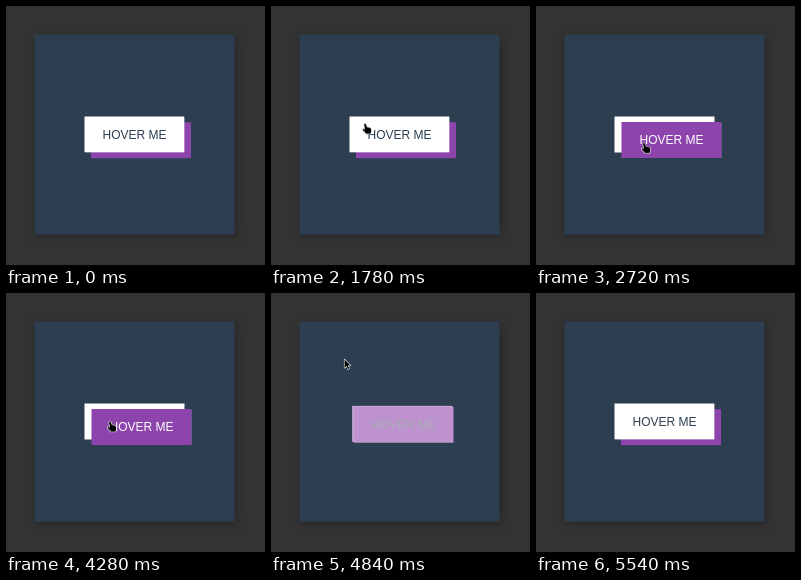
Animation of 259 by 259 pixels, one loop 8000 ms. Source, as an HTML page:

```html
<!DOCTYPE html>
<html lang="en">
<head>
<meta charset="utf-8">
<title>Hover button</title>
<style>
  html, body { margin: 0; width: 100%; height: 100%; overflow: hidden; background: #333; }
  svg { display: block; width: 100vw; height: 100vh; }
  .panel { fill: #2c3e50; filter: drop-shadow(2px 2px 4px rgba(0, 0, 0, .24)); }
  text { font: 12px "Liberation Sans", Arial, sans-serif; text-anchor: middle; }
  #pointer path { stroke: #fff; stroke-width: 1.1; stroke-linejoin: round; paint-order: stroke; }
</style>
</head>
<body>
<svg viewBox="0 0 259 259">
  <rect class="panel" x="28.5" y="28.5" width="200" height="200"/>
  <rect id="shade" width="100" height="36"/>
  <g id="face">
    <rect id="plate" width="100" height="36"/>
    <text id="label" x="50" y="22.2">HOVER ME</text>
  </g>
  <g id="pointer">
    <path id="arrow" d="M.5 .5V8.9L2.5 7.1L3.9 10.2L5.3 9.6L3.9 6.6H6.5Z"/>
    <path id="hand" d="M-1 .8Q-.2-.5 .8 .6L1.8 3.6L4.9 4.2Q6.2 4.6 6.2 6V8L5.3 10.3H1.2L-2.3 6.6Q-3 5.3-1.7 5.2L0 6.1Z"/>
  </g>
</svg>
<script>
const LOOP = 8000;
const WHITE = '#ffffff', PURPLE = '#8e44ad', NAVY = '#2c3e50';
const $ = id => document.getElementById(id);
const at = (x, y) => `translate(${x}px, ${y}px)`;

const tracks = [];
function track(id, prop, keys) {
  const frames = keys.map(([t, value, easing = 'linear']) =>
    ({ offset: t / LOOP, [prop]: value, easing }));
  const anim = $(id).animate(frames, { duration: LOOP, fill: 'both' });
  anim.pause();
  tracks.push(anim);
}

// Button: rests, turns over under the pointer, turns back
const enter = { from: 1960, to: 2720, ease: 'cubic-bezier(.35, .1, .55, .95)' };
const leave = { from: 4515, to: 5540, ease: 'cubic-bezier(.4, .1, .25, 1)' };
function hover(id, prop, rest, active) {
  track(id, prop, [
    [0, rest], [enter.from, rest, enter.ease], [enter.to, active],
    [leave.from, active, leave.ease], [leave.to, rest], [LOOP, rest]
  ]);
}
hover('face', 'transform', at(78.5, 110.5), at(85.5, 116));
hover('shade', 'transform', at(85, 116.2), at(78.5, 110.5));
hover('plate', 'fill', WHITE, PURPLE);
hover('shade', 'fill', PURPLE, WHITE);
hover('label', 'fill', NAVY, WHITE);

// Pointer: comes in from the top, rests on the button, goes back up
const above = at(52, -14), resting = at(108, 136.8);
track('pointer', 'transform', [
  [0, above], [480, above], [1260, at(74, 66)], [1780, at(94, 117.5)],
  [2300, at(104, 132.8)], [2720, resting], [4260, resting],
  [4280, at(104, 128.5)], [4840, at(73, 66)], [5540, at(46, -14)],
  [LOOP, above]
]);

function draw(now) {
  const t = now % LOOP;
  for (const anim of tracks) anim.currentTime = t;
  const over = t >= 1720 && t < 4460;
  $('hand').style.display = over ? '' : 'none';
  $('arrow').style.display = over ? 'none' : '';
}

const start = performance.now();
function loop() {
  draw(performance.now() - start);
  requestAnimationFrame(loop);
}
loop();
</script>
</body>
</html>
```
